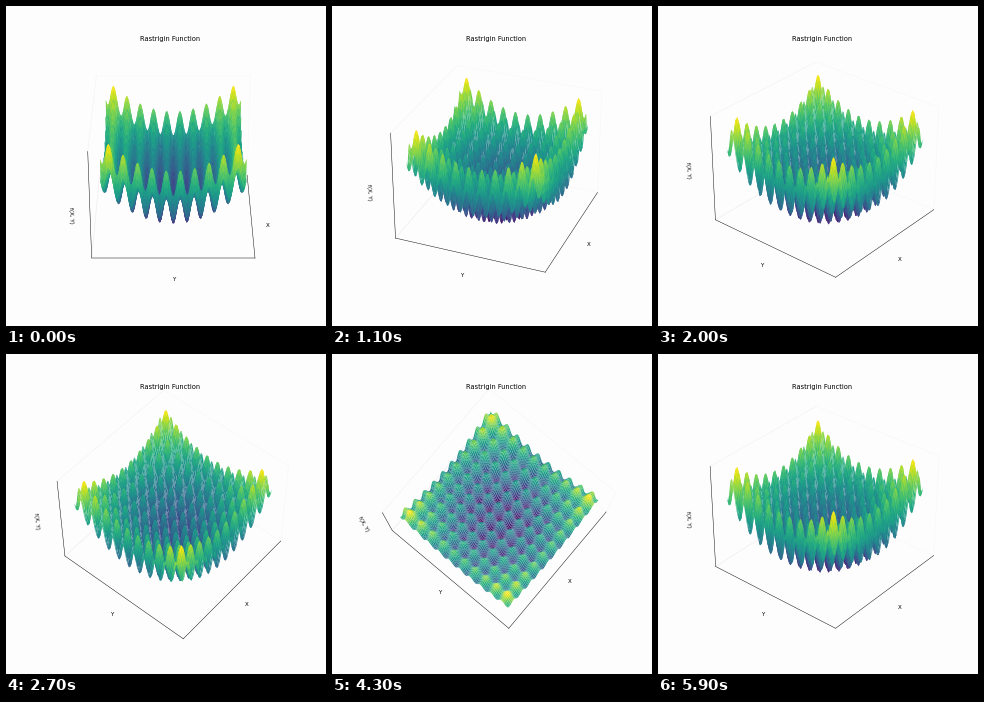
A matplotlib script that plays this animation: 320x320 px, repeating every 6 s.

```python
import numpy as np
import matplotlib.pyplot as plt
from matplotlib.animation import FuncAnimation

FRAMES = 60
BACKGROUND = "#fdfdfd"


def rastrigin(x, y):
    return 20 + sum(v**2 - 10 * np.cos(2 * np.pi * v) for v in (x, y))


def camera(frame):
    """Turn sideways first, then tilt to the top view and back."""
    azim = 2 * min(frame, 20)
    elev = 90 - 3 * min(abs(frame - 40), 20)
    return elev, azim


fig = plt.figure(figsize=(8, 8), dpi=40, facecolor=BACKGROUND)
ax = fig.add_subplot(projection="3d", facecolor=BACKGROUND)

side = np.linspace(-5.12, 5.12, 100)
X, Y = np.meshgrid(side, side)
ax.plot_surface(X, Y, rastrigin(X, Y), cmap="viridis", rstride=1, cstride=1)

ax.set_title("Rastrigin Function")
ax.set_xlabel("X")
ax.set_ylabel("Y")
ax.set_zlabel("f(X, Y)")
ax.grid(False)
for axis in (ax.xaxis, ax.yaxis, ax.zaxis):
    axis.set_ticks([])
    axis.pane.fill = False


def update(frame):
    elev, azim = camera(frame)
    ax.view_init(elev=elev, azim=azim)
    return ()


anim = FuncAnimation(fig, update, frames=FRAMES, interval=100, repeat=True,
                     repeat_delay=0, blit=False)
plt.show()
```
